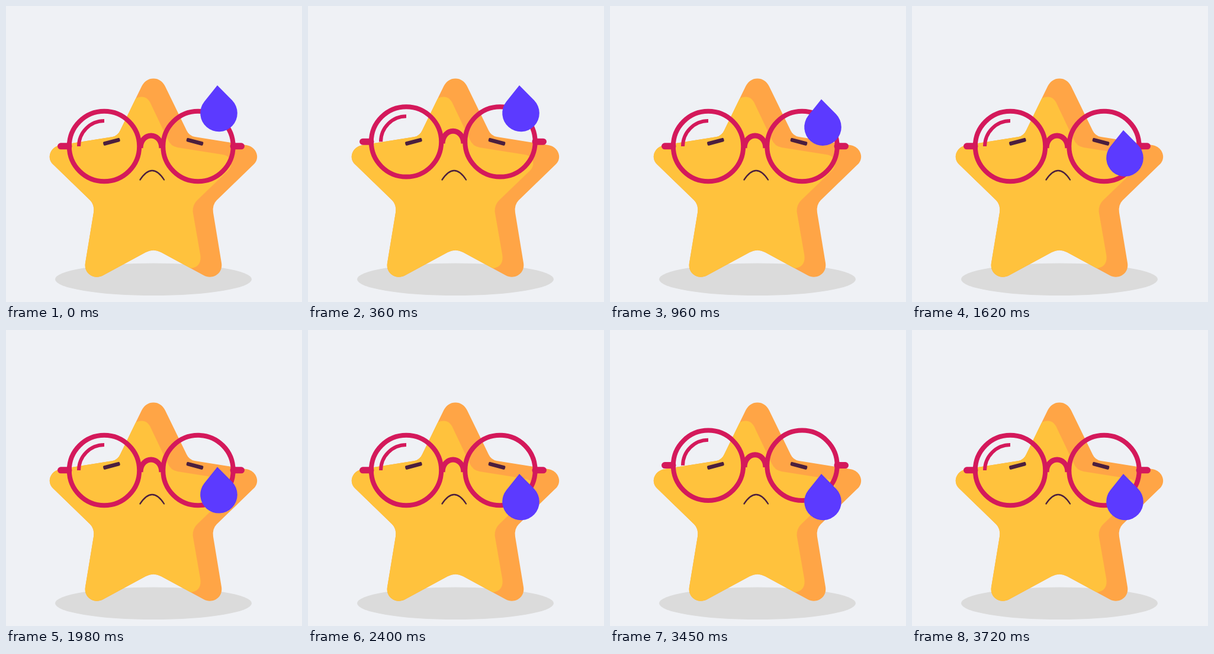
An HTML page that plays this animation: 500 px wide and 500 px high, repeating every 6.33 s.

```html
<!DOCTYPE html>
<html lang="en">
<head>
<meta charset="utf-8">
<title>Worried star</title>
<style>
  html, body { margin: 0; width: 100%; height: 100%; overflow: hidden; background: #eff1f5; }
  svg { display: block; width: 100%; height: 100%; }
</style>
</head>
<body>
<svg viewBox="0 0 500 500">
  <defs>
    <path id="star" d="M229 136Q236 122.5 249 122.5Q262 122.5 269 136L305 210Q309 219 319 221L406 235
      C424 238 430 258 418 268L356 328Q348 336 350 349L364 434C367 452 349 463 334 455L262 416
      Q249 409 236 416L164 455C149 463 131 452 134 434L148 349Q150 336 142 328L80 268
      C68 258 74 238 92 235L180 221Q189 219 193 210Z"/>
    <clipPath id="inside"><use href="#star"/></clipPath>
  </defs>

  <ellipse cx="249" cy="461.7" rx="166" ry="27.3" fill="#dbdbdb"/>
  <use href="#star" fill="#ffa546"/>
  <path clip-path="url(#inside)" fill="#ffc23d" d="M219 156Q235 149 243 162L273 225Q278 237 290 239
    L366 251C381 253 384 268 376 277L323 328Q314 337 316 350L328 419C331 435 323 443 310 443
    L200 480H0V200L200 150Z"/>

  <g fill="#4b1f3e">
    <rect x="-14.5" y="-3.3" width="29" height="6.6" rx="2" transform="translate(178.4 229.3) rotate(-15)"/>
    <rect x="-14.5" y="-3.3" width="29" height="6.6" rx="2" transform="translate(319 229.3) rotate(15)"/>
  </g>
  <path d="M226.5 293.5Q247 262.5 267 293.5" fill="none" stroke="#4b1f3e" stroke-width="2.3" stroke-linecap="round"/>

  <g id="glasses" fill="none" stroke="#d4195b" stroke-width="8">
    <circle cx="166" cy="237" r="59.2"/>
    <circle cx="324.5" cy="237" r="59.2"/>
    <path d="M227 240C228 212 262 212 263 240" stroke-width="9"/>
    <path d="M92.5 236.8H106M384 236.8H397.5" stroke-width="11" stroke-linecap="round"/>
    <path d="M123 237A43 43 0 0 1 166 194" stroke-width="6"/>
  </g>

  <path id="drop" fill="#5c3aff" d="M357 134L382 159.2A31.3 31.3 0 1 1 335 161.5Z"/>
</svg>
<script>
const LOOP = 6330, STEP = 30;
const glasses = document.getElementById('glasses');
const drop = document.getElementById('drop');

const clamp = v => Math.min(1, Math.max(0, v));
const span = (t, from, to) => clamp((t - from) / (to - from));

// Cubic bezier easing, solved by bisection
function bezier(x1, y1, x2, y2) {
  const at = (a, b, u) => 3 * a * u * (1 - u) ** 2 + 3 * b * u * u * (1 - u) + u ** 3;
  return x => {
    let lo = 0, hi = 1;
    for (let i = 0; i < 24; i++) {
      const mid = (lo + hi) / 2;
      if (at(x1, x2, mid) < x) lo = mid; else hi = mid;
    }
    return at(y1, y2, (lo + hi) / 2);
  };
}

const slide = bezier(0.167, 0.167, 0.667, 1);
const hop = p => -8.2 * 4 * p * (1 - p);

function draw(now) {
  const t = Math.floor((now % LOOP) / STEP) * STEP;
  const lift = hop(span(t, 0, 570)) + hop(span(t, 3150, 3720));
  const fall = 109 * slide(span(t, 660, 2400));
  glasses.setAttribute('transform', `translate(0 ${lift.toFixed(2)})`);
  drop.setAttribute('transform', `translate(0 ${fall.toFixed(2)})`);
}

let start;
function tick(now) {
  start ??= now;
  draw(now - start);
  requestAnimationFrame(tick);
}
draw(0);
requestAnimationFrame(tick);
</script>
</body>
</html>
```
